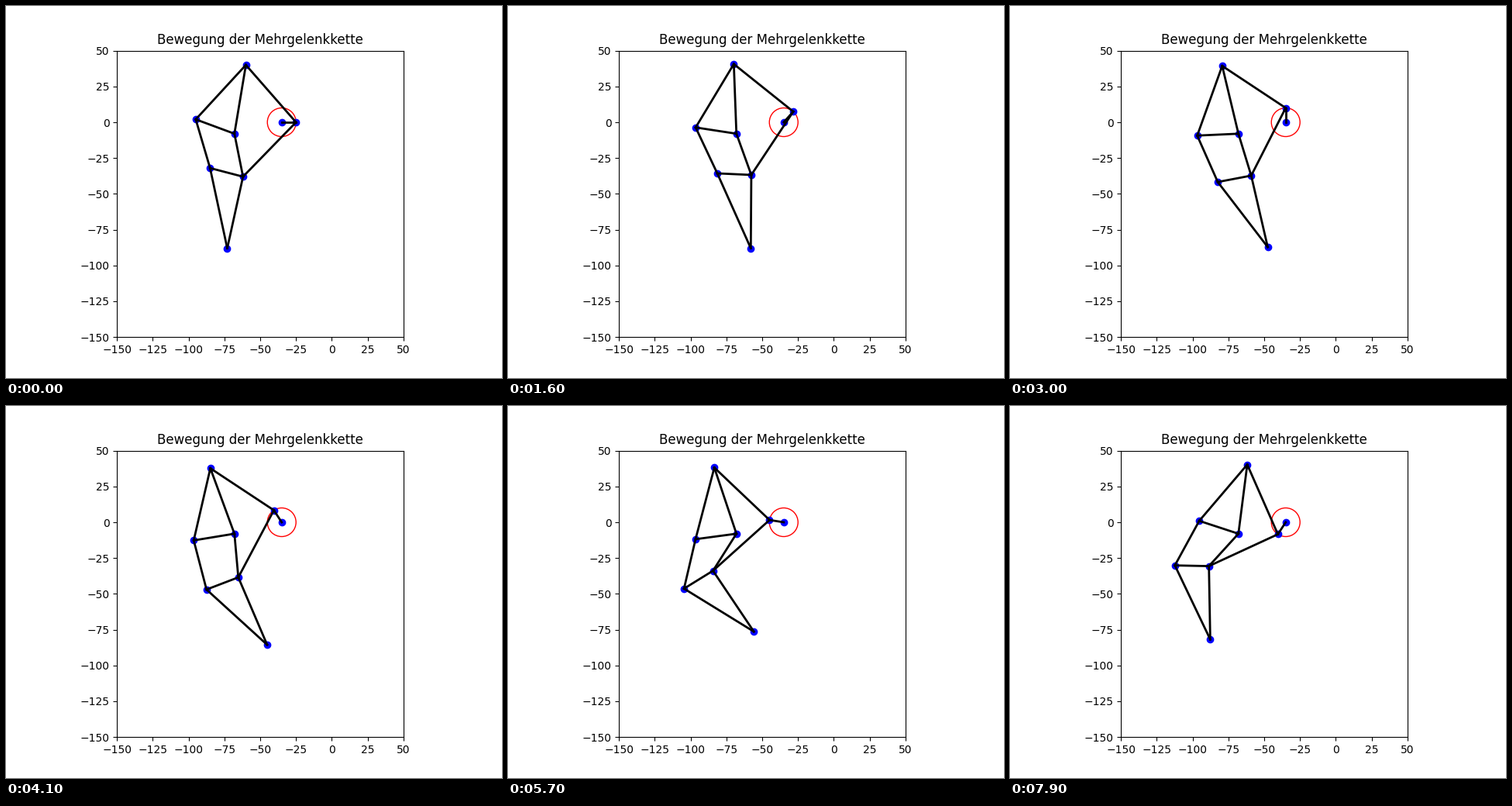
A matplotlib script for the animation above (8000 ms loop, 640x480 px).

```python
import numpy as np
import matplotlib.pyplot as plt
from matplotlib.animation import FuncAnimation

FRAMES, INTERVAL = 80, 100
STEP = np.radians(3)
RADIUS = 10

# Joint positions at crank angle zero
START = {
    "hub": (-35, 0), "pin": (-25, 0), "pivot": (-68, -8), "top": (-60, 40),
    "left": (-95, 2), "hip": (-62, -38), "knee": (-85, -32), "foot": (-73, -88),
}
START = {name: np.array(p, float) for name, p in START.items()}

# Each joint is held by rods to two joints that are already known
JOINTS = [
    ("top", "pin", "pivot"), ("hip", "pin", "pivot"), ("left", "pivot", "top"),
    ("knee", "left", "hip"), ("foot", "knee", "hip"),
]
RODS = [("hub", "pin"), ("pivot", "top"), ("pivot", "hip"), ("pin", "top"),
        ("pin", "hip"), ("left", "pivot"), ("left", "top"), ("left", "knee"),
        ("knee", "hip"), ("knee", "foot"), ("hip", "foot")]


def cross(u, v):
    return u[0] * v[1] - u[1] * v[0]


def meet(p, q, rp, rq, side):
    """Intersection of two circles on the given side of the line p-q."""
    d = np.hypot(*(q - p))
    along = (q - p) / d
    normal = np.array([-along[1], along[0]])
    a = (rp**2 - rq**2 + d**2) / (2 * d)
    return p + a * along + side * np.sqrt(max(rp**2 - a**2, 0)) * normal


def solve(angle):
    pos = {"hub": START["hub"], "pivot": START["pivot"]}
    pos["pin"] = pos["hub"] + RADIUS * np.array([np.cos(angle), np.sin(angle)])
    for name, a, b in JOINTS:
        s, p, q = START[name], START[a], START[b]
        side = np.sign(cross(q - p, s - p))
        pos[name] = meet(pos[a], pos[b], np.hypot(*(s - p)), np.hypot(*(s - q)), side)
    return pos


fig, ax = plt.subplots(figsize=(6.4, 4.8), dpi=100)
ax.set(xlim=(-150, 50), ylim=(-150, 50), aspect="equal",
       xticks=range(-150, 51, 25), yticks=range(-150, 51, 25),
       title="Bewegung der Mehrgelenkkette")
ax.add_patch(plt.Circle(START["hub"], RADIUS, color="r", fill=False))
dots, = ax.plot([], [], "bo")
rods = [ax.plot([], [], "k-", lw=2)[0] for _ in RODS]


def update(frame):
    pos = solve(frame * STEP)
    dots.set_data(*np.array(list(pos.values())).T)
    for line, (a, b) in zip(rods, RODS):
        line.set_data(*np.array([pos[a], pos[b]]).T)
    return [dots, *rods]


anim = FuncAnimation(fig, update, frames=FRAMES, interval=INTERVAL,
                     repeat=True, repeat_delay=0)
plt.show()
```
